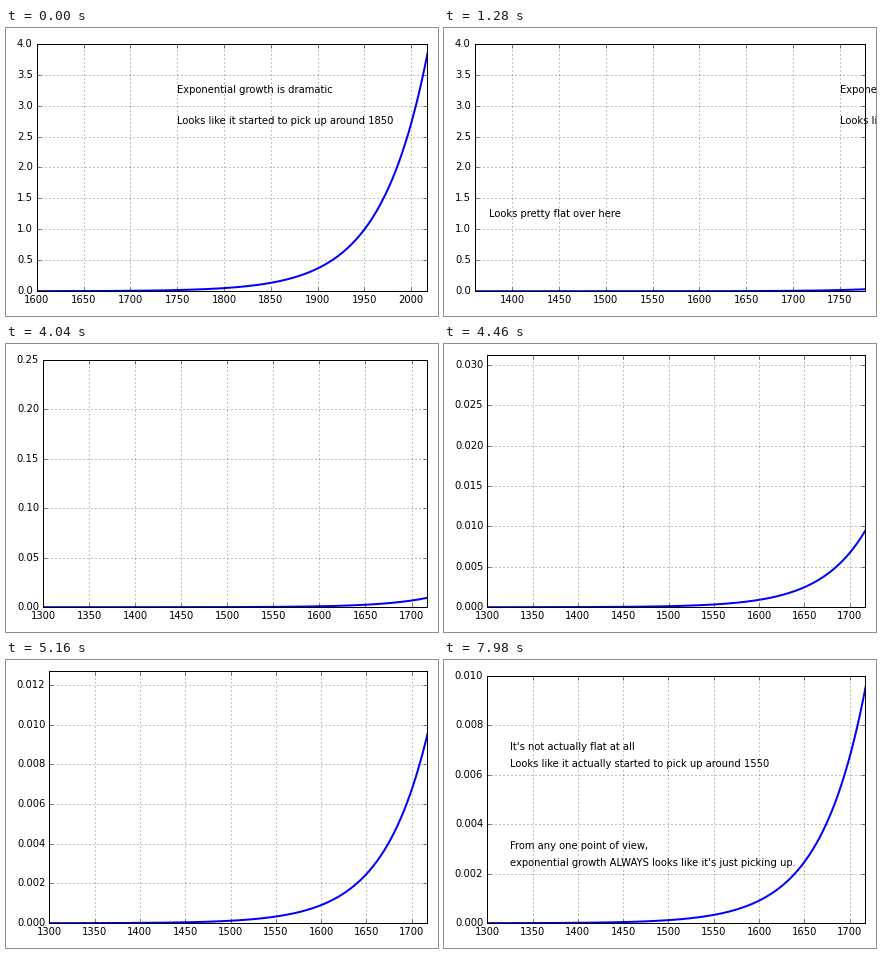
Recreate the animation shown at these times as a matplotlib script. Size 432 by 288 pixels, loop 8 s.

```python
import numpy as np
import matplotlib.pyplot as plt
from matplotlib.animation import FuncAnimation

plt.style.use("classic")
plt.rcParams.update({
    "font.family": "DejaVu Sans",
    "font.size": 10,
    "figure.facecolor": "white",
    "figure.edgecolor": "white",
    "savefig.dpi": "figure",
    "axes.formatter.useoffset": False,
})

STEP_MS = 20
FRAMES = 400
SPAN = 417            # years in view
PAN_START, PAN_STEPS = 500, 50
ZOOM_START, ZOOM_STEPS = 4000, 75

# (time it appears in ms, year, value, text)
NOTES = [
    (0, 1750, 3.2, "Exponential growth is dramatic"),
    (0, 1750, 2.7, "Looks like it started to pick up around 1850"),
    (0, 1375, 1.2, "Looks pretty flat over here"),
    (2480, 1375, 0.7, "...until you zoom in"),
    (5980, 1325, 0.007, "It's not actually flat at all"),
    (6480, 1325, 0.0063, "Looks like it actually started to pick up around 1550"),
    (7980, 1325, 0.003, "From any one point of view,"),
    (7980, 1325, 0.0023, "exponential growth ALWAYS looks like it's just picking up."),
]

fig, ax = plt.subplots(figsize=(6, 4), dpi=72)
years = np.linspace(1250, 2020, 1541)
ax.plot(years, np.exp((years - 1950) / 50), "b", linewidth=2)
ax.grid(True)

labels = []
for _, year, value, text in NOTES:
    label = ax.text(year, value, text)
    label.set_in_layout(False)
    labels.append(label)


def steps_done(t, start, count):
    return min(max((t - start) // STEP_MS + 1, 0), count)


def top_value(k):
    return 0.01 * ZOOM_STEPS / k if k else 4.0


def fitted_box(k):
    """Axes box that leaves just enough room for the tick labels."""
    ax.set_ylim(0, top_value(k))
    fig.tight_layout()
    return ax.get_position().frozen()


ax.set_xlim(1600, 1600 + SPAN)
boxes = [fitted_box(k) for k in range(ZOOM_STEPS + 1)]


def update(i):
    t = i * STEP_MS
    left = 1600 - 6 * steps_done(t, PAN_START, PAN_STEPS)
    k = steps_done(t, ZOOM_START, ZOOM_STEPS)
    ax.set_position(boxes[k])
    ax.set_xlim(left, left + SPAN)
    ax.set_ylim(0, top_value(k))
    for label, note in zip(labels, NOTES):
        label.set_visible(t >= note[0])
    return []


anim = FuncAnimation(fig, update, frames=FRAMES, interval=STEP_MS,
                     init_func=lambda: update(0), repeat=True, repeat_delay=0)
plt.show()
```
